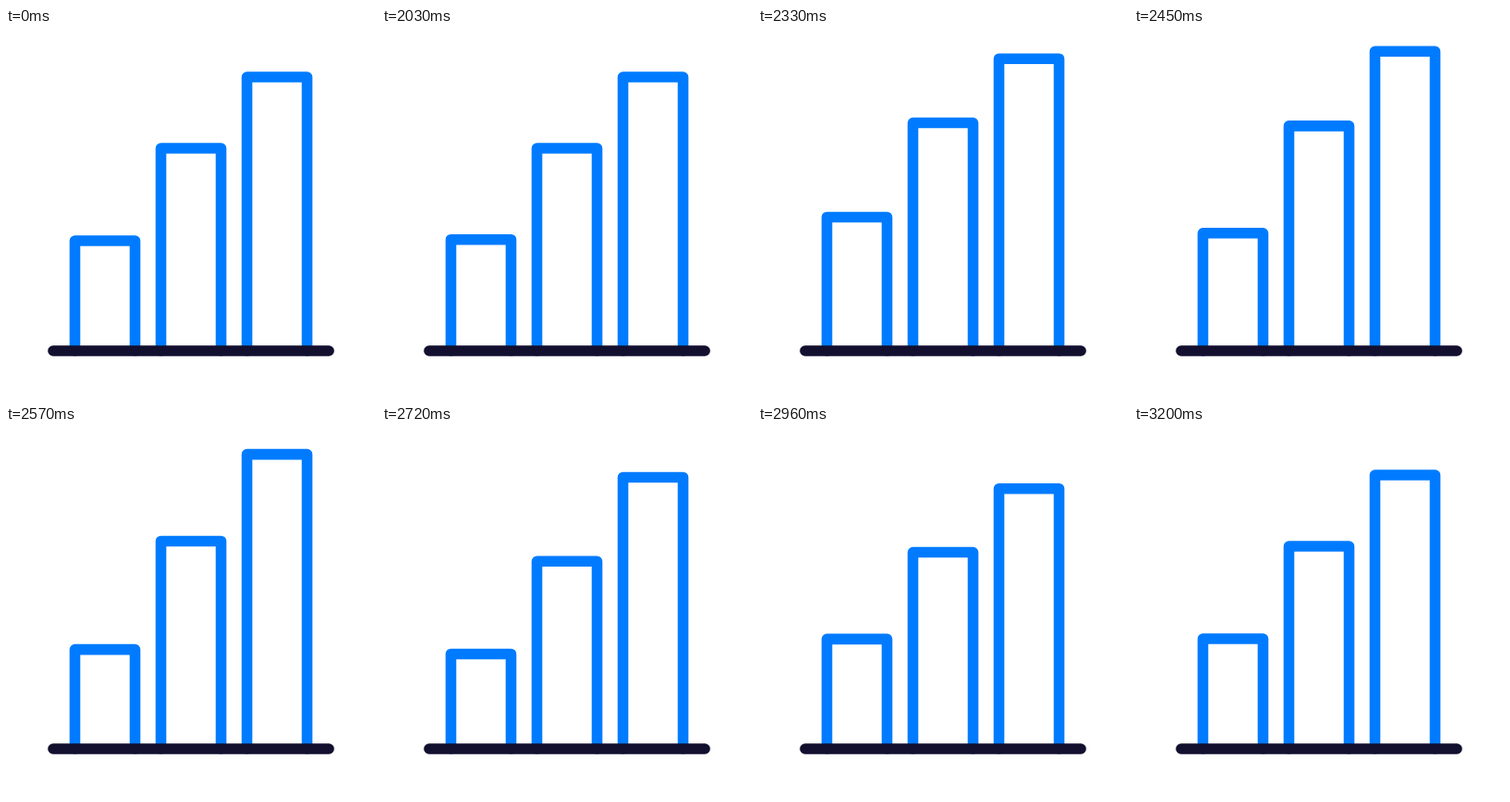
These frames come from a looping animation (400x400 px, 3.23 s). An HTML page:

```html
<!DOCTYPE html>
<html lang="en">
<head>
<meta charset="utf-8">
<title>Bar chart</title>
<style>
  html, body { margin: 0; width: 100%; height: 100%; overflow: hidden; background: #fff; }
  svg { display: block; width: 100%; height: 100%; }
  path { fill: none; stroke-width: 11.6; stroke-linecap: round; stroke-linejoin: round; }
  .bar { stroke: #007bff; }
</style>
</head>
<body>
<svg viewBox="0 0 400 400">
  <path class="bar"/>
  <path class="bar"/>
  <path class="bar"/>
  <path d="M51 349H349" stroke="#120f2f"/>
</svg>
<script>
const LOOP = 3230, START = 2000, STEP = 30, LAG = 3.5;
const bars = [[74.5, 230], [167.5, 130], [260.5, 53]];
const paths = document.querySelectorAll('.bar');

// cubic-bezier(x1, 0, x2, 1)
function ease(x, x1, x2) {
  let lo = 0, hi = 1, p;
  for (let i = 0; i < 24; i++) {
    p = (lo + hi) / 2;
    const q = 1 - p;
    if (3 * q * q * p * x1 + 3 * q * p * p * x2 + p * p * p < x) lo = p; else hi = p;
  }
  return p * p * (3 - 2 * p);
}

// Each stage: start step, end step, start offset, end offset, easing handles
const stages = [
  [0, 9.2, 0, -28, 1 / 3, 0.2],
  [9.2, 22, -28, 18, 1 / 3, 2 / 3],
  [22, 33, 18, 0, 1 / 3, 2 / 3],
];

function offset(u) {
  const stage = stages.find(([a, b]) => u > a && u < b);
  if (!stage) return u === 22 ? 18 : 0;
  const [a, b, from, to, x1, x2] = stage;
  return from + (to - from) * ease((u - a) / (b - a), x1, x2);
}

function draw() {
  const step = Math.floor((performance.now() % LOOP - START) / STEP);
  bars.forEach(([x, y], i) => {
    const top = y + offset(step - i * LAG);
    paths[i].setAttribute('d', `M${x} 349V${top}h65V349`);
  });
  requestAnimationFrame(draw);
}
draw();
</script>
</body>
</html>
```
